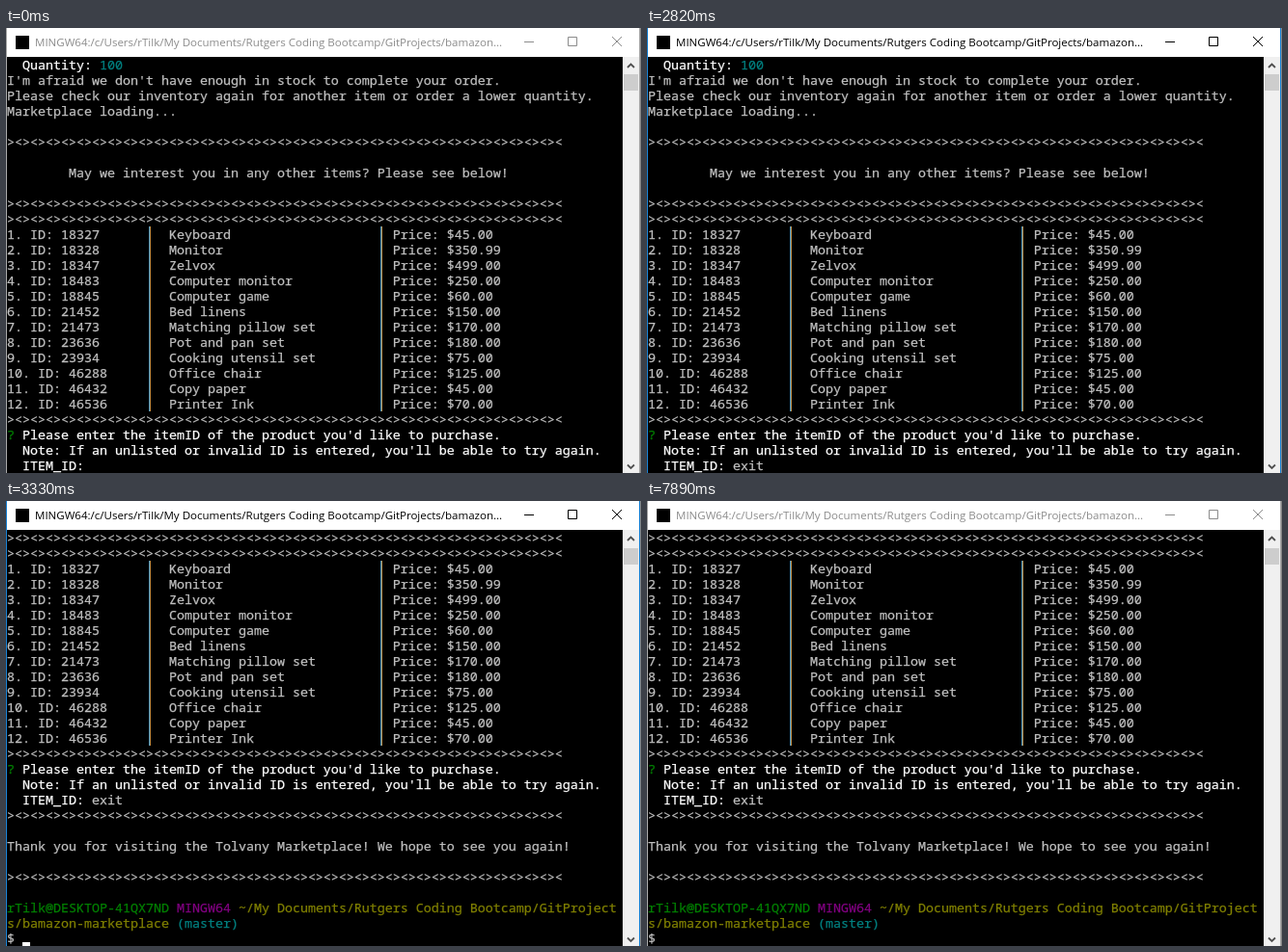
An HTML page that plays this animation: 658x462 px, repeating every 8.01 s.

```html
<!DOCTYPE html>
<html lang="en">
<head>
<meta charset="utf-8">
<title>Terminal</title>
<style>
  html, body { margin: 0; width: 658px; height: 462px; overflow: hidden; background: #fff; }
  #screen { position: absolute; left: 1px; top: 30px; width: 638px; height: 432px; overflow: hidden; background: #000; }
  pre {
    position: absolute; left: 0; margin: 0; color: #c0c0c0;
    font: 13.3333px/16px "Noto Sans Mono", monospace;
    -webkit-text-stroke: .25px;
  }
  pre b { color: #fff; font-weight: normal; }
  .green { color: #008000; }
  .teal { color: #008080; }
  .purple { color: #800080; }
  .olive { color: #808000; }
  /* a stem on a pixel boundary, with subpixel colour fringes */
  .bar {
    display: inline-block; height: 16px; vertical-align: top; color: transparent;
    background: linear-gradient(90deg, #4a96c0 50%, #c0904a 50%) 3px 0 / 2px 16px no-repeat;
  }
  #cursor { position: absolute; top: 428px; width: 8px; height: 4px; background: #fff; }
  svg { position: absolute; left: 0; top: 0; --ink: #8c8c8c; --edge: #aaa; }
  svg.active { --ink: #000; --edge: #1883d7; }
  svg text { font: 11.52px "Open Sans", sans-serif; fill: var(--ink); }
  .buttons { fill: none; stroke: var(--ink); }
  .edge { fill: none; stroke: var(--edge); }
  .arrows { fill: none; stroke: #505050; stroke-width: 1.8; }
</style>
</head>
<body>
<div id="screen"><pre id="output"></pre><div id="cursor"></div></div>
<svg id="frame" width="658" height="462">
  <rect x="10" y="8" width="14" height="14"/>
  <text x="30" y="19">MINGW64:/c/Users/rTilk/My Documents/Rutgers Coding Bootcamp/GitProjects/bamazon...</text>
  <path class="buttons" d="M537 14.5h10M582.5 9.5h9v9h-9zM628 9l10 10M638 9l-10 10"/>
  <rect x="639" y="30" width="17" height="432" fill="#f0f0f0"/>
  <rect id="thumb" x="640" y="48" width="15" height="17" fill="#cdcdcd"/>
  <path class="arrows" d="M644 41l3.5-3.5 3.5 3.5M644 453.5l3.5 3.5 3.5-3.5"/>
  <path class="edge" d="M.5 0V462M656.5 0V462"/>
  <rect x="657" width="1" height="462" fill="#888"/>
</svg>
<script>
const $ = id => document.getElementById(id);
const span = (color, text) => `<span class="${color}">${text}</span>`;
const rule = '>&lt;'.repeat(36);

const items = [
  [18327, 'Keyboard', '45.00'],
  [18328, 'Monitor', '350.99'],
  [18347, 'Zelvox', '499.00'],
  [18483, 'Computer monitor', '250.00'],
  [18845, 'Computer game', '60.00'],
  [21452, 'Bed linens', '150.00'],
  [21473, 'Matching pillow set', '170.00'],
  [23636, 'Pot and pan set', '180.00'],
  [23934, 'Cooking utensil set', '75.00'],
  [46288, 'Office chair', '125.00'],
  [46432, 'Copy paper', '45.00'],
  [46536, 'Printer Ink', '70.00']
];
const bar = span('bar', '|');
const itemRow = ([id, name, price], i) =>
  `${i + 1}. ID: ${id}`.padEnd(18) + bar + '  ' + name.padEnd(27) + bar + ` Price: $${price}`;

$('output').innerHTML = [
  `<b>  Quantity: </b>${span('teal', '100')}`,
  "I'm afraid we don't have enough in stock to complete your order.",
  'Please check our inventory again for another item or order a lower quantity.',
  'Marketplace loading...',
  '', rule, '',
  '        May we interest you in any other items? Please see below!',
  '', rule, rule,
  ...items.map(itemRow),
  rule,
  span('green', '?') + "<b> Please enter the itemID of the product you'd like to purchase.</b>",
  "<b>  Note: If an unlisted or invalid ID is entered, you'll be able to try again.</b>",
  '<b>  ITEM_ID: </b><span id="answer"></span>',
  rule, '',
  'Thank you for visiting the Tolvany Marketplace! We hope to see you again!',
  '', rule, '',
  `${span('green', 'rTilk@DESKTOP-41QX7ND')} ${span('purple', 'MINGW64')} ` +
    span('olive', '~/My Documents/Rutgers Coding Bootcamp/GitProject'),
  `${span('olive', 's/bamazon-marketplace')} ${span('teal', '(master)')}`,
  '$ '
].join('\n');

const LOOP = 8010;
const HIDDEN = -1;
// [start ms, rows scrolled, typed letters, cursor column]
const steps = [
  [0, 0, 0, HIDDEN],
  [1320, 0, 0, 11],
  [1470, 0, 1, 12],
  [1830, 0, 1, HIDDEN],
  [2100, 0, 2, 13],
  [2280, 0, 3, 14],
  [2340, 0, 3, HIDDEN],
  [2460, 0, 4, 15],
  [2820, 0, 4, HIDDEN],
  [3270, 6, 4, 0],
  [3300, 8, 4, HIDDEN],
  [3330, 9, 4, 2],
  [3780, 9, 4, HIDDEN],
  [4260, 9, 4, 2],
  [4770, 9, 4, HIDDEN],
  [5280, 9, 4, 2],
  [5790, 9, 4, HIDDEN],
  [6300, 9, 4, 2],
  [6810, 9, 4, HIDDEN],
  [7320, 9, 4, 2],
  [7830, 9, 4, HIDDEN]
];

function draw(t) {
  const [, scroll, typed, column] = steps.findLast(([start]) => start <= t);
  $('output').style.top = -16 * scroll + 'px';
  $('answer').textContent = 'exit'.slice(0, typed);
  $('cursor').style.left = 8 * column + 'px';
  $('cursor').hidden = column === HIDDEN;
  $('thumb').setAttribute('y', scroll === 9 ? 49 : 48);
  $('frame').classList.toggle('active', t >= 810 && t < 7890);
}

const begin = performance.now();
function tick() {
  draw((performance.now() - begin) % LOOP);
  requestAnimationFrame(tick);
}
tick();
</script>
</body>
</html>
```
